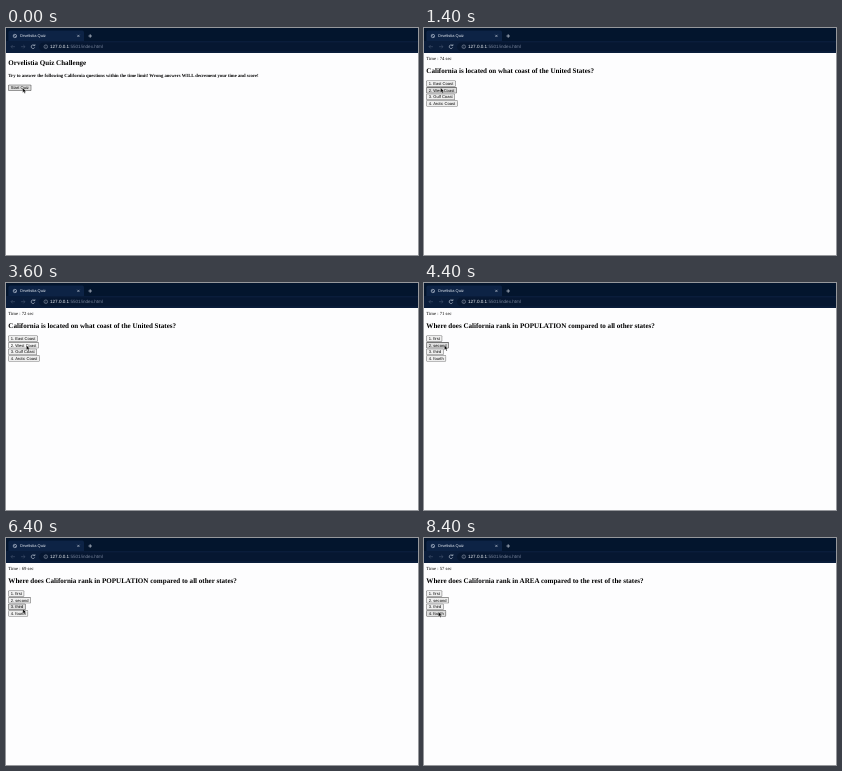
These frames come from a looping animation (412x227 px, 9 s). An HTML page with a canvas:

```html
<!DOCTYPE html>
<html lang="en">
<head>
<meta charset="utf-8">
<title>Orvelistia Quiz</title>
<style>
html, body { margin: 0; width: 412px; height: 227px; overflow: hidden; background: #fdfdfe; }
canvas, svg { position: absolute; left: 0; top: 0; width: 412px; height: 227px; }
text { text-rendering: geometricPrecision; white-space: pre; }
.serif { font-family: "Liberation Serif", Times, serif; fill: #000; }
.sans { font-family: "Liberation Sans", Arial, sans-serif; }
.bold { font-weight: bold; }
</style>
</head>
<body>
<canvas id="stage"></canvas>
<svg viewBox="0 0 412 227">
  <g class="sans">
    <text x="13.8" y="9.3" font-size="4" fill="#e6ebf3">Orvelistia Quiz</text>
    <text x="44" y="20.4" font-size="4.6" fill="#eef1f6">127.0.0.1<tspan fill="#77839a">:5501/index.html</tspan></text>
  </g>
  <text id="timer" class="serif" x="2.35" y="31.5" font-size="4.7"></text>
  <text id="title" class="serif bold" x="2.35" font-size="7.05"></text>
  <text id="intro" class="serif bold" x="2.35" y="49.2" font-size="4.7">Try to answer the following California questions within the time limit! Wrong answers WILL decrement your time and score!</text>
  <g id="labels" class="sans" font-size="4.1" text-anchor="middle" fill="#000"></g>
  <path id="pointer" d="M0 0V4.9L1.1 3.9L1.9 5.7L2.8 5.3L2 3.6H3.5Z" fill="#000" stroke="#fff" stroke-width=".35"/>
</svg>
<script>
const LOOP = 9000, STEP = 100, LEFT = 2.35, PITCH = 6.6, HEIGHT = 6.25, SHIFT = 7.8;
const $ = id => document.getElementById(id);
const canvas = $('stage'), ctx = canvas.getContext('2d');
const ratio = window.devicePixelRatio || 1;
canvas.width = 412 * ratio;
canvas.height = 227 * ratio;

const ranks = ['first', 'second', 'third', 'fourth'];
const screens = [
  { at: 0, title: 'Orvelistia Quiz Challenge', answers: ['Start Quiz'] },
  { at: 300, title: 'California is located on what coast of the United States?',
    answers: ['East Coast', 'West Coast', 'Gulf Coast', 'Arctic Coast'] },
  { at: 3700, title: 'Where does California rank in POPULATION compared to all other states?', answers: ranks },
  { at: 7500, title: 'Where does California rank in AREA compared to the rest of the states?', answers: ranks }
];
const presses = [[100, 300], [3500, 3700], [7400, 7500]];

// time, x, y of the pointer tip
const route = [
  [0, 16.7, 59.8], [1800, 16.7, 59.8], [2200, 18.8, 66.3], [2600, 20.4, 62.2],
  [5900, 20.4, 62.2], [6400, 16.8, 70.8], [6700, 14.4, 73.8], [LOOP, 14.4, 73.8]
];

const labels = [0, 1, 2, 3].map(() =>
  $('labels').appendChild(document.createElementNS('http://www.w3.org/2000/svg', 'text')));

function pointerAt(t) {
  const i = route.findIndex(p => p[0] > t);
  const [t0, x0, y0] = route[i - 1], [t1, x1, y1] = route[i];
  const k = (t - t0) / (t1 - t0);
  return [x0 + (x1 - x0) * k, y0 + (y1 - y0) * k];
}

function box(x, y, w, h, r, fill) {
  ctx.fillStyle = fill;
  ctx.beginPath();
  ctx.roundRect(x, y, w, h, r);
  ctx.fill();
}

function line(points, color, width = 0.6) {
  ctx.strokeStyle = color;
  ctx.lineWidth = width;
  ctx.beginPath();
  points.forEach(([x, y]) => ctx.lineTo(x, y));
  ctx.stroke();
}

function ring(x, y, r, color, from = 0, to = 2 * Math.PI) {
  ctx.strokeStyle = color;
  ctx.lineWidth = 0.6;
  ctx.beginPath();
  ctx.arc(x, y, r, from, to);
  ctx.stroke();
}

function arrow(x, dir, color) {
  line([[x - 2, 18.7], [x + 2, 18.7]], color);
  line([[x + dir * 0.3, 17], [x + dir * 2, 18.7], [x + dir * 0.3, 20.4]], color);
}

function drawBrowser() {
  box(0, 0, 412, 25, 0, '#03152d');
  box(2.4, 2.4, 75.6, 14, 2, '#0d2345');
  box(0, 13, 412, 12, 0, '#0a1d3b');
  box(33, 14.4, 379, 8.8, [4.4, 0, 0, 4.4], '#061731');

  ring(8.9, 8, 1.7, '#c9d3e2');
  line([[7.6, 7.2], [9, 8], [10, 9.2]], '#c9d3e2', 0.5);
  line([[71.3, 6.8], [73.5, 9]], '#dfe5ee', 0.5);
  line([[73.5, 6.8], [71.3, 9]], '#dfe5ee', 0.5);
  line([[82.4, 8], [86, 8]], '#dfe5ee');
  line([[84.2, 6.2], [84.2, 9.8]], '#dfe5ee');

  arrow(7, -1, '#45556f');
  arrow(17, 1, '#45556f');
  ring(27, 18.7, 1.8, '#cfd7e4', 0.4, 5.6);
  line([[27.4, 17.6], [28.9, 17.6], [28.9, 16.2]], '#cfd7e4');
  ring(39.8, 18.7, 1.8, '#8d97a9');
  line([[39.8, 18.5], [39.8, 19.7]], '#8d97a9', 0.5);
  line([[39.8, 17.5], [39.8, 18]], '#8d97a9', 0.5);
}

function drawButton(label, text, top, tip, pressed) {
  label.textContent = text;
  if (!text) return;
  ctx.font = '41px "Liberation Sans", Arial, sans-serif';
  const width = ctx.measureText(text).width / 10 + 4.7;
  const [x, y] = tip;
  const over = x > LEFT && x < LEFT + width && y > top && y < top + HEIGHT;
  const edge = over ? (pressed ? '#777' : '#4f4f4f') : '#767676';
  const face = over ? (pressed ? '#f5f5f5' : '#dedede') : '#efefef';
  box(LEFT, top, width, HEIGHT, 0.7, edge);
  box(LEFT + 0.55, top + 0.55, width - 1.1, HEIGHT - 1.1, 0.3, face);
  label.setAttribute('x', LEFT + width / 2);
  label.setAttribute('y', top + HEIGHT / 2 + 1.42);
}

function draw(now) {
  const t = Math.floor((now % LOOP) / STEP) * STEP;
  const screen = screens.filter(s => s.at <= t).pop();
  const start = screen === screens[0];
  const ticks = Math.floor((t - 400) / 1000);
  const shown = ticks > 0;
  const shift = shown ? SHIFT : 0;
  const penalty = t >= 8400 ? 10 : 0;
  const tip = pointerAt(t);
  const pressed = presses.some(([a, b]) => t >= a && t < b);

  ctx.setTransform(ratio, 0, 0, ratio, 0, 0);
  box(0, 0, 412, 227, 0, '#fdfdfe');
  drawBrowser();

  $('timer').textContent = shown ? `Time : ${75 - ticks - penalty} sec` : '';
  $('title').textContent = screen.title;
  $('title').setAttribute('y', 37 + shift);
  $('intro').style.display = start ? '' : 'none';
  const top = start ? 56.8 : 44.7 + shift;
  labels.forEach((label, i) => {
    const answer = screen.answers[i];
    const text = answer ? (start ? answer : `${i + 1}. ${answer}`) : '';
    drawButton(label, text, top + i * PITCH, tip, pressed);
  });
  $('pointer').setAttribute('transform', `translate(${tip})`);
}

const begin = performance.now();
function frame() {
  draw(performance.now() - begin);
  requestAnimationFrame(frame);
}
frame();
</script>
</body>
</html>
```
